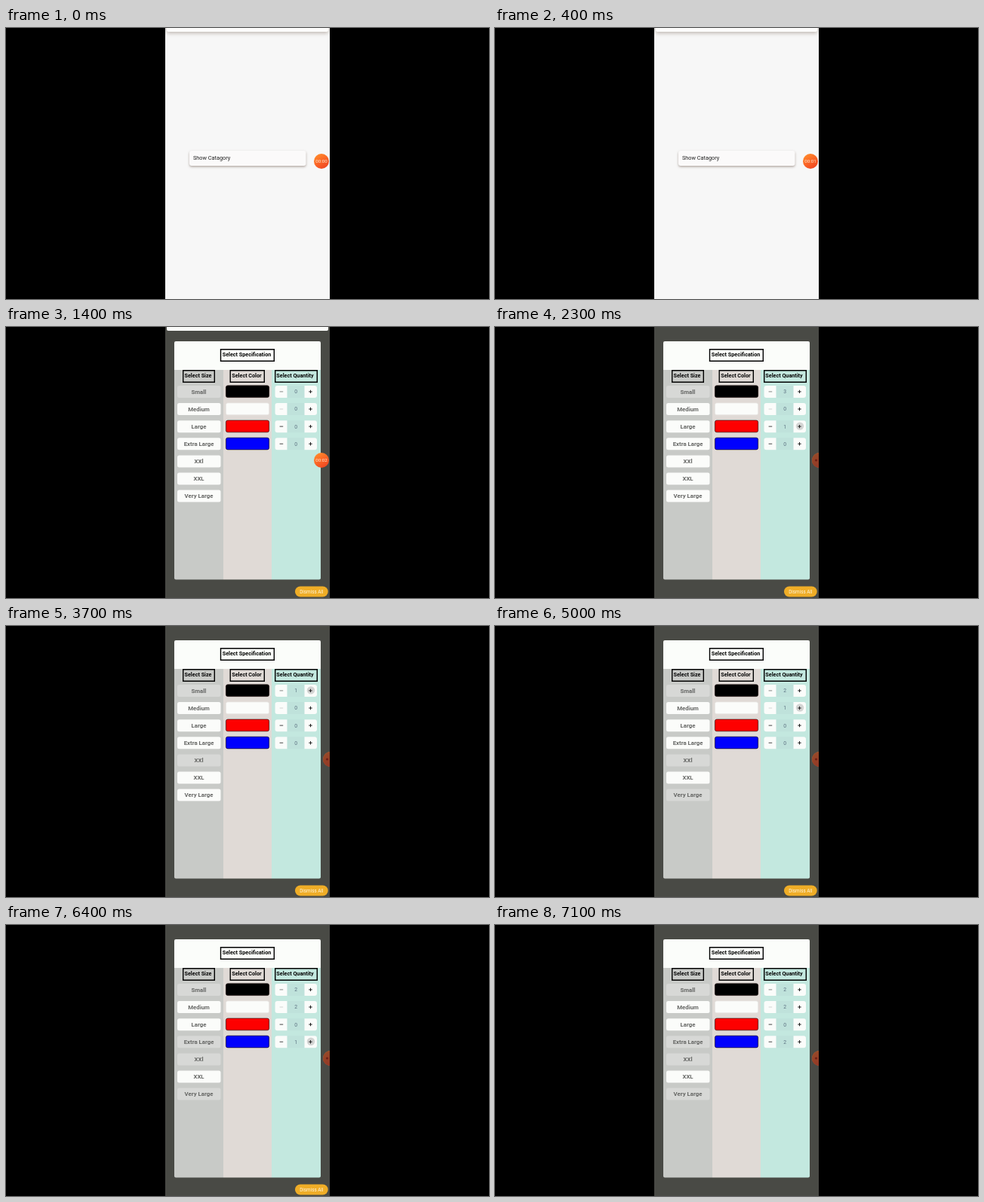
An HTML page with a canvas that plays this animation: 640x360 px, repeating every 7.7 s.

```html
<!DOCTYPE html>
<html lang="en">
<head>
<meta charset="utf-8">
<title>Select Specification</title>
<style>
html, body { margin: 0; width: 100%; height: 100%; overflow: hidden; background: #000; }
canvas { display: block; width: 640px; height: 360px; }
</style>
</head>
<body>
<canvas id="stage" width="640" height="360"></canvas>
<script>
const ctx = document.getElementById('stage').getContext('2d');
const LOOP = 7700, STEP = 100;
const OPEN = 600;
const ROW_TOP = 78, PITCH = 23.1, ROW_H = 16;

const sizes = ['Small', 'Medium', 'Large', 'Extra Large', 'XXl', 'XXL', 'Very Large'];
const colors = ['#000', '#fbfcfa', '#fe0000', '#0000fe'];

// size row, press time, release time
const picks = [[0, 1300, 1400], [4, 3000, 3100], [6, 4200, 4300], [3, 5500, 5800]];
const resets = [1400, 3100, 4300, 5600];
// quantity row, time
const taps = [
  [0, 1600], [0, 1800], [0, 2000], [2, 2300], [2, 2500], [2, 2700],
  [0, 3700], [1, 3900],
  [0, 4500], [0, 4700], [1, 5000],
  [0, 5800], [0, 5900], [1, 6000], [1, 6200], [3, 6400], [3, 6500]
];

const clamp = v => Math.max(0, Math.min(1, v));
const ramp = (t, a, b) => clamp((t - a) / (b - a));
const rowY = i => ROW_TOP + i * PITCH;

function box(x, y, w, h, fill, r = 0, stroke) {
  ctx.beginPath();
  ctx.roundRect(x, y, w, h, r);
  if (fill) { ctx.fillStyle = fill; ctx.fill(); }
  if (stroke) { ctx.strokeStyle = stroke; ctx.stroke(); }
}

function disc(x, y, r, fill) {
  ctx.beginPath();
  ctx.arc(x, y, r, 0, Math.PI * 2);
  ctx.fillStyle = fill;
  ctx.fill();
}

function text(s, x, y, size, color, weight = 400, align = 'center') {
  ctx.font = `${weight} ${size}px Roboto, sans-serif`;
  ctx.textAlign = align;
  ctx.fillStyle = color;
  ctx.fillText(s, x, y);
}

function withShadow(color, blur, dy, draw) {
  ctx.save();
  ctx.shadowColor = color;
  ctx.shadowBlur = blur;
  ctx.shadowOffsetY = dy;
  draw();
  ctx.restore();
}

function home(t) {
  box(211, 0, 218, 360, '#f7f7f7');
  withShadow('rgba(110,90,75,.4)', 5, 2, () => box(213, -8, 214, 13, '#fdfdfc', 2));
  withShadow('rgba(110,90,75,.5)', 3, 1.5, () => box(243, 163, 154.5, 20, '#fbfafa', 3));
  if (t >= 100 && t < 400) box(243, 163, 154.5, 20, 'rgba(0,0,0,.06)', 3);
  text('Show Catagory', 248, 174.6, 7.3, '#1c1c1c', 400, 'left');
}

function heading(s, x, y, w, tx) {
  ctx.lineWidth = 1.4;
  box(x + .7, y + .7, w - 1.4, 15.6, null, 0, '#000');
  text(s, tx, y + 10.3, 7.2, '#050505', 700);
}

function sizeButton(i, t) {
  const pick = picks.find(p => p[0] === i);
  const down = pick && t >= pick[1];
  const held = down && t < pick[2];
  const y = rowY(i);
  box(227, y, 57.5, ROW_H, held ? '#d0cfca' : down ? '#d7d8d6' : '#fbfcfa', 2.5);
  text(sizes[i], 255.5, y + 10.8, 7.8, held ? '#9a9a96' : '#666765', 700);
}

function colorBar(i) {
  const y = rowY(i);
  ctx.lineWidth = .8;
  const edge = i === 1 ? '#e9e6e3' : 'rgba(20,0,0,.75)';
  box(291.4, y - .2, 57.2, ROW_H - .2, colors[i], 2.5, edge);
}

function count(row, t) {
  const start = Math.max(0, ...resets.filter(r => r <= t));
  return taps.filter(([r, at]) => r === row && at >= start && at <= t).length;
}

function stepper(i, t) {
  const y = rowY(i), mid = y + 7.9;
  box(356.5, y, 55.5, ROW_H, '#bfe2db', 3);
  box(356.5, y, 16, ROW_H, '#fafcfa', [3, 0, 0, 3]);
  box(395.5, y, 16.5, ROW_H, '#fafcfa', [0, 3, 3, 0]);
  for (const [row, at] of taps) {
    const age = t - at;
    if (row === i && age >= 0 && age < 200) {
      disc(404, mid - .5, 5.2, `rgba(60,60,60,${.2 * (1 - age / 200)})`);
    }
  }
  const minus = ['#858885', '#d0d2d0', '#454545', '#454545'][i];
  box(362.6, mid - .5, 4.6, 1, minus);
  box(401.3, mid - .5, 4.4, 1, '#202020');
  box(403, mid - 2.2, 1, 4.4, '#202020');
  text(count(i, t), 384.2, mid + 2.4, 6.8, '#5b7180');
}

function dialog(t) {
  box(211, 0, 218, 360, '#494a45');
  if (t < 1700) box(213, -5, 214, 10, '#fbfcfa', 2);
  ctx.save();
  ctx.beginPath();
  ctx.roundRect(223, 19, 194, 316.5, 2);
  ctx.clip();
  box(223, 19, 194, 38, '#fbfdfa');
  box(223, 57, 65, 279, '#c8cac7');
  box(288, 57, 64, 279, '#e0dad6');
  box(352, 57, 65, 279, '#c3e8df');
  ctx.restore();
  heading('Select Specification', 283.8, 29, 72.2, 319);
  heading('Select Size', 234, 57, 43, 254.5);
  heading('Select Color', 296.5, 57, 46.5, 319);
  heading('Select Quantity', 356, 57, 57, 383);
  sizes.forEach((_, i) => sizeButton(i, t));
  colors.forEach((_, i) => { colorBar(i); stepper(i, t); });

  ctx.globalAlpha = 1 - ramp(t, 6900, 7100);
  box(383, 344.5, 43.7, 14, '#efad27', 7);
  text('Dismiss All', 404.8, 353.8, 6.3, '#fff6df');
  ctx.globalAlpha = 1;
}

function bubble(t) {
  const k = ramp(t, 1600, 2000);
  const x = 418 + 12 * k;
  const g = ctx.createLinearGradient(x - 6, 168, x + 6, 187);
  g.addColorStop(0, '#ff8a2c');
  g.addColorStop(.5, '#fa6426');
  g.addColorStop(1, '#ee4421');
  ctx.save();
  ctx.beginPath();
  ctx.rect(211, 0, 218, 360);
  ctx.clip();
  disc(x, 177, 10, g);
  if (k > 0) disc(x, 177, 10, `rgba(110,48,40,${.72 * k})`);
  if (k < .5) {
    const sec = t < 400 ? 0 : t < 1400 ? 1 : 2;
    text('00:0' + sec, x, 179.2, 6.2, '#ffe6d6');
  } else {
    disc(x - 4.5, 177, 1.6, '#6e1f18');
  }
  ctx.restore();
}

function frame(now) {
  const t = Math.floor((now % LOOP) / STEP) * STEP;
  box(0, 0, 640, 360, '#000');
  ctx.save();
  ctx.beginPath();
  ctx.rect(211, 0, 218, 360);
  ctx.clip();
  if (t < OPEN) home(t); else dialog(t);
  ctx.restore();
  bubble(t);
}

const begin = performance.now();
function tick() {
  frame(performance.now() - begin);
  requestAnimationFrame(tick);
}
tick();
</script>
</body>
</html>
```
